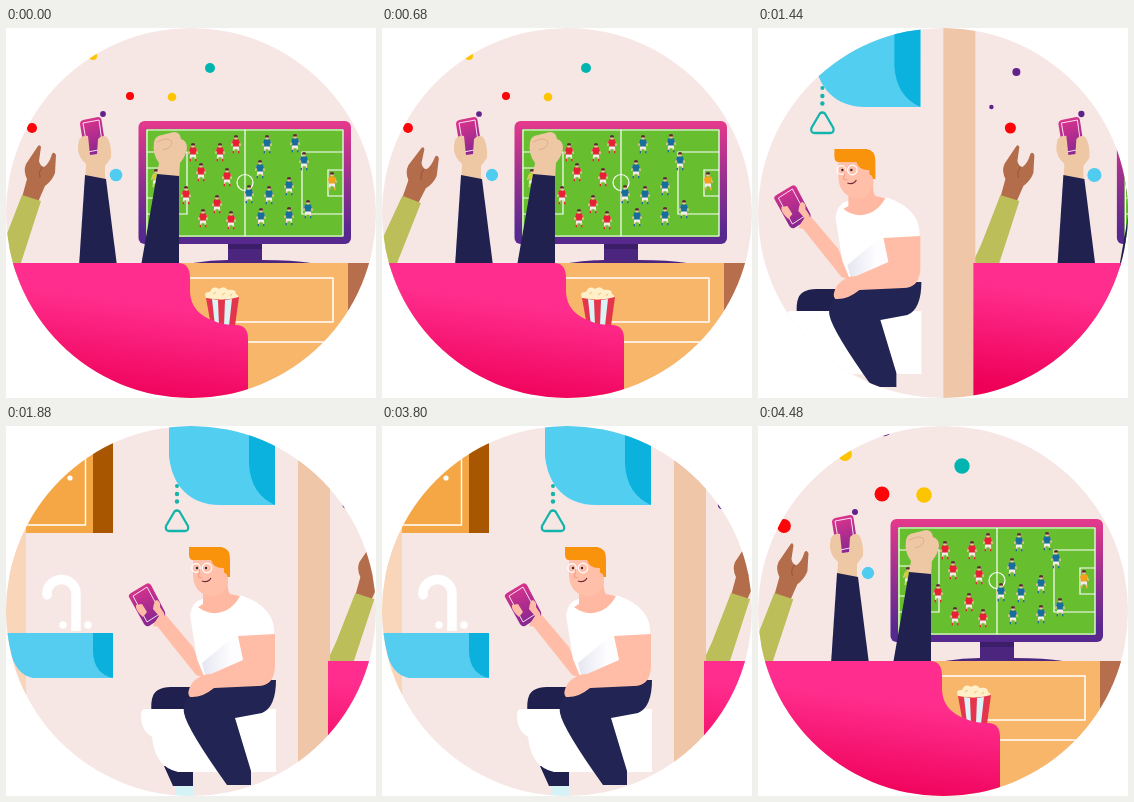
An HTML page for the animation above (4.52 s loop, 370 by 370 pixels).

```html
<!DOCTYPE html>
<html lang="en">
<head>
<meta charset="utf-8">
<title>Match day</title>
<style>
html, body { margin: 0; width: 100%; height: 100%; overflow: hidden; background: #fff; }
svg { display: block; width: 370px; height: 370px; }
.line { fill: none; stroke: #fff; }
.round { stroke-linecap: round; stroke-linejoin: round; }
</style>
</head>
<body>
<svg viewBox="0 0 370 370">
  <defs>
    <clipPath id="lens"><circle cx="185" cy="185" r="185"/></clipPath>
    <linearGradient id="sofa" gradientUnits="userSpaceOnUse" x1="80" y1="235" x2="62" y2="365">
      <stop offset=".25" stop-color="#ff2d8d"/><stop offset="1" stop-color="#ee0058"/>
    </linearGradient>
    <linearGradient id="tv" x2="0" y2="1">
      <stop stop-color="#e5398c"/><stop offset=".5" stop-color="#93308f"/><stop offset=".9" stop-color="#57298f"/>
    </linearGradient>
    <linearGradient id="phone" x2=".3" y2="1">
      <stop stop-color="#e6358b"/><stop offset="1" stop-color="#8a2791"/>
    </linearGradient>
    <linearGradient id="fold" x2="1" y2="0">
      <stop stop-color="#e6e6f1"/><stop offset=".6" stop-color="#fdfdff"/>
    </linearGradient>
    <g id="player">
      <path d="M-2 3L-2.6 9M2 3L2.8 9" stroke="#f0c3a0" stroke-width="1.5"/>
      <path d="M-3 -3L-4.4 2M3 -3L4.4 2" stroke="#f0c3a0" stroke-width="1.3"/>
      <path d="M-3 -4.5H3L4 -1L2.7 0V3H-2.7V0L-4 -1Z" fill="currentColor"/>
      <path d="M-2.8 2.5H2.8L3.2 5.6H.6L0 4.4L-.6 5.6H-3.2Z" fill="#f5eef0"/>
      <path d="M-2.7 7V9.3M2.8 7V9.3" stroke="currentColor" stroke-width="1.5"/>
      <circle cy="-6.6" r="2" fill="#f0c3a0"/>
      <path d="M-2.2 -6.6A2.2 2.3 0 0 1 2.2 -6.6Z" fill="#5a2b32"/>
    </g>
  </defs>

  <g clip-path="url(#lens)">
    <rect width="370" height="370" fill="#f6e7e5"/>
    <g id="world">

      <!-- bathroom -->
      <g transform="translate(-333)">
        <rect x="-40" y="80" width="60" height="290" fill="#f9d5ba"/>
        <rect x="20" width="67" height="107" fill="#f5a645"/>
        <rect x="87" width="20" height="107" fill="#a85600"/>
        <path class="line" d="M20 99H79.500V0" stroke-width="1.400"/>
        <circle cx="64" cy="52" r="2.600" fill="#fff"/>
        <path d="M0 207H107V252H27Q8 248 4 222Z" fill="#54cdf0"/>
        <path d="M87 207H107V252Q88 248 87 226Z" fill="#0cb0dc"/>
        <path class="line" d="M70 205V168A14.500 14 0 0 0 41 167V169" stroke-width="9.500"/>
        <circle cx="41" cy="169" r="4.700" fill="#fff"/>
        <circle cx="57" cy="199" r="3.700" fill="#fff"/>
        <circle cx="82" cy="199" r="3.700" fill="#fff"/>

        <path d="M163 0V30C166 60 184 79 214 79H269V0Z" fill="#52cef1"/>
        <path d="M243 0V38C244 58 253 72 269 79V0Z" fill="#0cb2de"/>
        <g fill="#12b4ab"><circle cx="171" cy="60" r="2"/><circle cx="171" cy="68" r="2.200"/><circle cx="171" cy="75.500" r="2.200"/></g>
        <path class="round" d="M168.500 85.500Q171 83.500 173.500 85.500L182 100Q183 105 179 105H163Q159 105 160 100Z" fill="none" stroke="#12b4ab" stroke-width="2.300"/>

        <!-- far leg, bowl, near leg -->
        <path d="M170 357H187V372H169Z" fill="#d5f3f7"/>
        <path d="M152 264Q143 269 146 290H186L205 261H165Q157 261 152 264ZM158 340H187V360H167Z" fill="#1f204d"/>
        <path d="M139 283H270V346H172Q149 341 146 311Q135 305 135 290Q135 283 139 283Z" fill="#fff"/>
        <path d="M190 264Q176 273 178 287Q181 303 221 359H245V345L229 292L256 287Q270 281 270 254H205Z" fill="#222453"/>

        <path d="M187 221L199 252L190 249L151 200L159 188Z" fill="#ffbda7"/>
        <path d="M196 173Q186 176 184 189L191 233L198 250L199 259H245L268 211Q271 182 237 170L220 168L196 173Z" fill="#fff"/>
        <path d="M197 162V178L192 181Q201 188 211 187Q226 185 234 170L224 168Q221 164 222 154Z" fill="#ffb9a3"/>
        <path d="M196 237L226 212L243 226L244 232L200 252Z" fill="url(#fold)"/>
        <path d="M232 210L269 208V241Q268 260 252 260L208 262Q196 272 184 271Q180 267 186 257Q194 248 205 248L237 234Z" fill="#ffbda7"/>
        <path d="M187 134V150Q188 166 202 170Q219 173 222 154V135L211 130Z" fill="#ffbfa9"/>
        <path d="M183 121H215Q224 122 224 133V151H218V142Q208 143 205 134H187Q183 134 183 128Z" fill="#fa930c"/>
        <circle cx="217" cy="151" r="4.500" fill="#ffbfa9"/>
        <g fill="none" stroke="#fff" stroke-width="1.200"><circle cx="190" cy="142" r="4.300"/><circle cx="201" cy="142" r="4.800"/></g>
        <g fill="#39233d"><circle cx="191" cy="142" r="1.200"/><circle cx="200" cy="142" r="1.200"/></g>
        <path d="M194 143L192 151L196 152" fill="none" stroke="#f39a88"/>
        <path d="M196 155Q202 157 205 152" fill="none" stroke="#6b2b35" stroke-width="1.200"/>

        <path d="M125 167L140 158Q143 156 145 159L159 186Q160 189 157 191L143 200Q140 201 138 198L123 171Q122 169 125 167Z" fill="url(#phone)"/>
        <path class="line" d="M127 170L141 161L155 187L141 196Z" opacity=".85"/>
        <path d="M147 183Q148 174 151 174Q155 176 154 181L158 187Q161 195 154 201L147 200L149 196L153 190Z" fill="#ffbda7"/>
        <path d="M130 179L136 178L141 186L137 191Q129 184 130 179Z" fill="#ffbda7"/>
      </g>

      <!-- living room -->
      <rect x="172" y="235" width="170" height="135" fill="#f8b66b"/>
      <rect x="342" y="235" width="60" height="135" fill="#b66e4c"/>
      <path class="line" d="M175 250H327V294H200M200 314H327V370" stroke-width="1.500"/>
      <path d="M187 235Q205 232 222 232V214H256V232Q287 232 305 235Z" fill="#4c257f"/>
      <path d="M222 216H256V221H222Z" fill="#3b1d68"/>
      <rect x="132.500" y="93" width="212.500" height="123" rx="6" fill="url(#tv)"/>
      <rect x="140" y="101" width="197.500" height="108" rx="2" fill="#67be2f"/>
      <g class="line" stroke-width="1.200">
        <path d="M141 102H337V208H141ZM239 102V208M141 124H181V186H141M141 140H154V170H141M337 124H296V186H337M337 142H322V168H337"/>
        <circle cx="239" cy="154.500" r="8"/>
      </g>
      <g id="teams"></g>

      <path d="M200 270Q197 263 204 264Q207 257 213 261Q218 257 222 262Q230 261 230 266Q234 267 231 273Z" fill="#fff0ca"/>
      <path d="M200 270Q216 274 233 269L229 298H205Z" fill="#e5344d"/>
      <path d="M206 271L212 272L213 298H209ZM219 272L226 271L223 298H218Z" fill="#d9f3f6"/>
      <path d="M207 266L210 264M216 267L219 265M224 268L226 266" stroke="#f4cf8e" stroke-width="1.500"/>

      <g id="dots"></g>

      <g id="arm">
        <path d="M15 173L21 151Q17 143 20 136L32 118Q34 116 35 119L33 133Q34 138 38 139Q43 136 46 126Q48 123 50 127L49 145Q46 153 39 158L32 174Z" fill="#b46d4b"/>
        <path d="M36 139Q32 144 34 150" fill="none" stroke="#94533b"/>
        <path d="M16 167L35 173L12 244H-16L-3 216Z" fill="#bcbe5a"/>
      </g>

      <path d="M77 92L92 89Q95 89 95.500 92L100 122Q100 125 97 126L83 129Q80 129 79 126L74 96Q74 93 77 92Z" fill="url(#phone)"/>
      <path class="line" d="M77 95L93 92L97 121L82 124Z" opacity=".85"/>
      <path d="M73 112Q76 107 82 108L84 127L91 126L92 111Q96 106 101 109Q106 117 105 130L99 138V153H79L80 136Q71 128 72 118Z" fill="#eec8a4"/>
      <path d="M79 147L100 151L111 238H73Z" fill="#20214f"/>

      <path d="M148 114Q149 108 156 107L168 104Q174 104 175 111Q181 113 181 120Q180 128 174 135L173 151H150L153 135Q146 126 148 114Z" fill="#eec8a4"/>
      <path d="M151 114Q163 108 166 114Q166 120 157 122" fill="none" stroke="#dcae8a"/>
      <path d="M151 146L173 148V238H135Z" fill="#20214f"/>

      <rect x="-41" y="0" width="32" height="370" fill="#efc6a7"/>
      <path d="M-11 235H172Q184 235 184 250V264Q185 285 208 293Q216 297 230 297Q242 297 242 311V370H-11Z" fill="url(#sofa)"/>
    </g>
  </g>
</svg>
<script>
const LOOP = 4520, STEP = 40, SWAY = 480, PULSE = 692, ROOM_GAP = 333;
const $ = id => document.getElementById(id);
const add = (parent, tag, attrs) => {
  const el = document.createElementNS('http://www.w3.org/2000/svg', tag);
  for (const key in attrs) el.setAttribute(key, attrs[key]);
  return parent.appendChild(el);
};

const teams = {
  '#e81f35': [[169,114],[187,124],[214,124],[230,116],[195,144],[221,149],[180,167],[211,176],[197,190],[225,192]],
  '#176d9c': [[261,116],[289,115],[298,133],[254,141],[243,166],[283,158],[263,167],[302,181],[255,189],[283,188]],
  '#c6d533': [[150,150]],
  '#f6a11a': [[326,153]]
};
for (const color in teams)
  for (const [x, y] of teams[color])
    add($('teams'), 'use', { href: '#player', color, transform: `translate(${x} ${y})` });

const red = '#fb0509', yellow = '#fdc400', teal = '#00b5b0', blue = '#4fccef', purple = '#61228c';
// x, y, colour, smallest radius, growth, phase
const dots = [
  [26, 100, red, 4.7, 2.4, .12], [124, 68, red, 4, 3.5, 0],
  [166, 69, yellow, 4.3, 3.5, 0], [204, 40, teal, 5, 2.7, 0],
  [87, 28, yellow, 4, 3, -.02], [110, 147, blue, 4.5, 3.2, .27],
  [97, 86, purple, 2.4, 1, .25], [32, 44, purple, 4, 4, -.1],
  [7, 79, purple, 2.1, 2.1, 0], [126, 3, purple, 3, 4.3, 0]
].map(([cx, cy, fill, min, grow, phase]) =>
  ({ el: add($('dots'), 'circle', { cx, cy, fill }), min, grow, phase }));

const wave = turns => (1 - Math.cos(2 * Math.PI * turns)) / 2;
const ease = (t, from, to) => {
  const p = Math.min(1, Math.max(0, (t - from) / (to - from)));
  return p * p * (3 - 2 * p);
};

function draw(t) {
  const pan = ROOM_GAP * (ease(t, 1323, 1511) - ease(t, 3853, 4040));
  $('world').setAttribute('transform', `translate(${pan.toFixed(2)})`);

  // The arm rests from the seventh swing until the camera is back.
  const resting = t >= 3360 && t < 4040;
  const swing = resting ? 0 : wave((t < 3360 ? t : t - 4040) / SWAY);
  $('arm').setAttribute('transform', `rotate(${4 * swing} 5 234)`);

  for (const d of dots) d.el.setAttribute('r', d.min + d.grow * wave(t / PULSE + d.phase));
}

// Motion advances 25 times a second.
const start = performance.now();
function tick() {
  const t = (performance.now() - start) % LOOP;
  draw(Math.floor(t / STEP) * STEP);
  requestAnimationFrame(tick);
}
tick();
</script>
</body>
</html>
```
